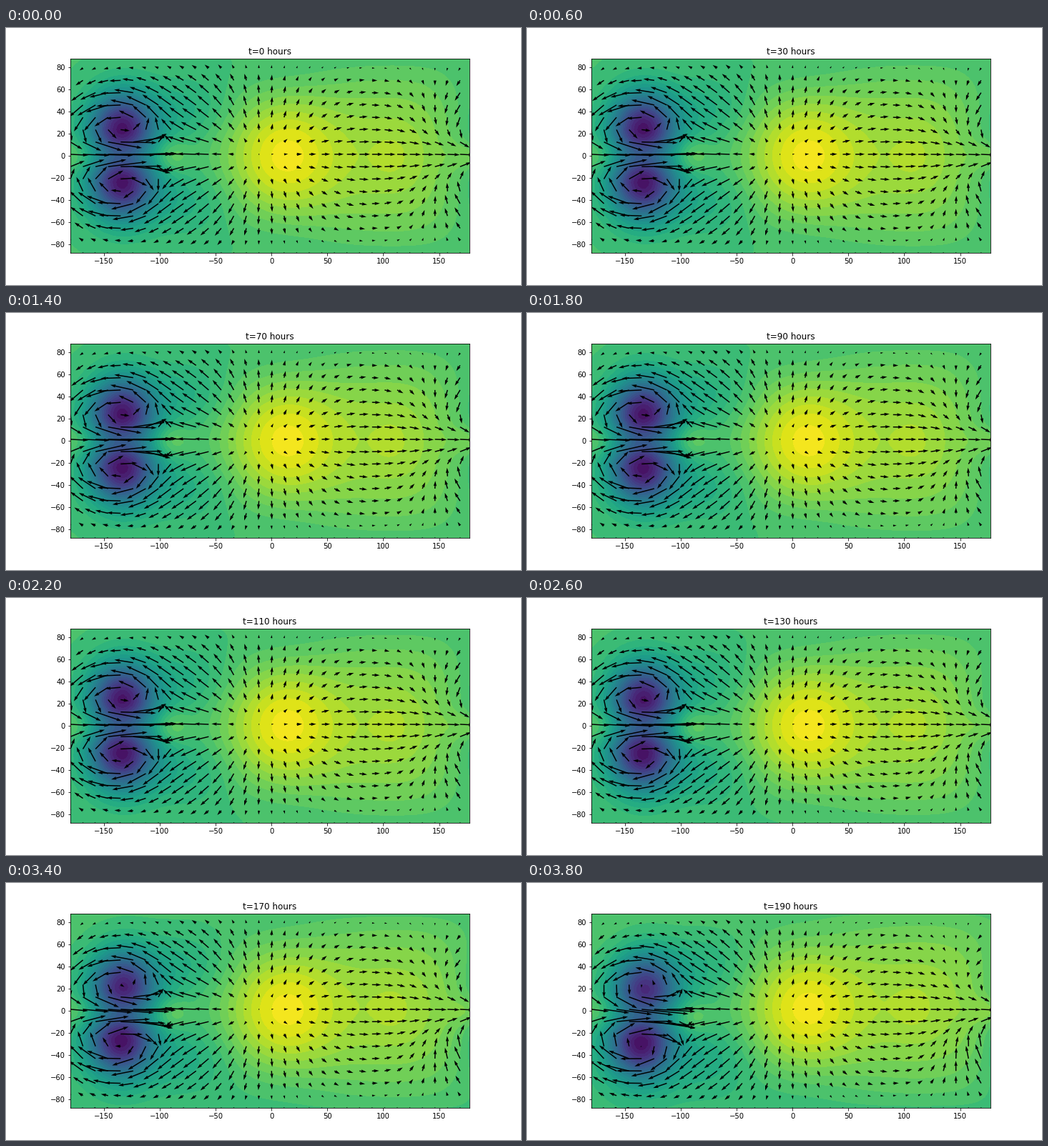
A matplotlib script that plays this animation: 720 by 360 pixels, repeating every 4000 ms.

```python
import numpy as np
import matplotlib.pyplot as plt
from matplotlib.animation import FuncAnimation

plt.rcParams["font.family"] = "DejaVu Sans"
FRAMES, STEP_HOURS = 20, 10
LEVELS = np.linspace(0, 1, 31)

lon = np.arange(128) * 360 / 128 - 180
lat = np.degrees(np.arcsin(np.polynomial.legendre.leggauss(64)[0]))
X, Y = np.meshgrid(lon, lat)
XS, YS = X[::4, ::4], Y[::4, ::4]


def wrap(d):
    return (d + 180) % 360 - 180


def bell(d, low, high=None):
    """Gaussian with separate widths below and above its centre."""
    s = np.where(d < 0, low, high or low)
    return np.exp(-0.5 * (d / s) ** 2)


def rise(x, x0, width):
    return 0.5 * (1 + np.tanh((x - x0) / width))


def growth(hours):
    """Size of the slowly growing north-south asymmetry."""
    return np.exp((hours - 190) / 33)


def centre(side, a):
    return -134 + 2 * side * a, 24.3 * side - 4.5 * a


def height(x, y, a):
    c = np.cos(np.radians(y))
    plateau = 0.15 * rise(x, 45, 40) * (1 - rise(x, 157 + 12 * a, 27))
    phi = 0.703 + plateau * c ** 0.8                      # evening side
    phi += 0.257 * bell(x - 9, 36, 34) * c ** 2.2         # hot spot
    phi += 0.03 * bell(x - 108, 16) * bell(y, 20)
    phi += 0.07 * bell(wrap(x - 180), 15) * bell(y, 9)
    phi += 0.09 * bell(x + 89, 11) * bell(y + 6 * a, 10)
    for side in (1, -1):
        x0, y0 = centre(side, a)
        depth = 0.645 - 0.035 * a * (1 + side)
        phi -= depth * bell(wrap(x - x0), 20.5) * bell(side * (y - y0), 16.3, 23)
        phi -= 0.085 * bell(x + 77, 29) * bell(y - side * 41, 22)
    phi += 0.02 * a * np.sin(np.radians(y))
    return np.clip(phi, 0.001, 0.999)


def wind(x, y, a):
    """Arrow components in pixels: day-side outflow plus two vortices."""
    broad = (-18 * bell(x + 67, 28) + 11.5 * bell(x - 88, 47, 38)
             - 8 * bell(wrap(x - 178), 24))
    jet = (-14 * bell(x + 79, 15) + 20 * bell(wrap(x - 172), 36)
           + 4 * bell(x - 45, 40))
    poleward = 14 * bell(x + 40, 45, 65) - 11 * bell(wrap(x - 158), 38)
    s = np.sin(np.radians(2 * y))
    u = broad * (1 - (y / 88) ** 4) + jet * bell(y, 17)
    v = poleward * s * (1 - 0.45 * a * s * rise(x, 110, 15))
    v -= 4 * a * bell(x + 130, 30) * bell(y, 14)
    for side in (1, -1):
        x0, y0 = centre(side, a)
        dx, dy = wrap(x - x0) / 26, (y - y0) / 22
        w = (33 * side - 2 * a) * np.exp(0.5 - 0.5 * (dx ** 2 + dy ** 2))
        u -= w * dy
        v += 0.5 * w * dx
    return u, v


fig, ax = plt.subplots(figsize=(10, 5), dpi=72)
fig.subplots_adjust(left=0.125, right=0.9, bottom=0.125, top=0.88)


def draw(i):
    hours = i * STEP_HOURS
    a = growth(hours)
    ax.clear()
    ax.contourf(X, Y, height(X, Y, a), levels=LEVELS, cmap="viridis")
    ax.quiver(XS, YS, *wind(XS, YS, a), scale=558, scale_units="width")
    ax.set_xlim(lon[0], lon[-1])
    ax.set_ylim(lat[0], lat[-1])
    ax.set_title(f"t={hours} hours")
    return []


anim = FuncAnimation(fig, draw, frames=FRAMES, interval=200, repeat=True)
plt.show()
```
